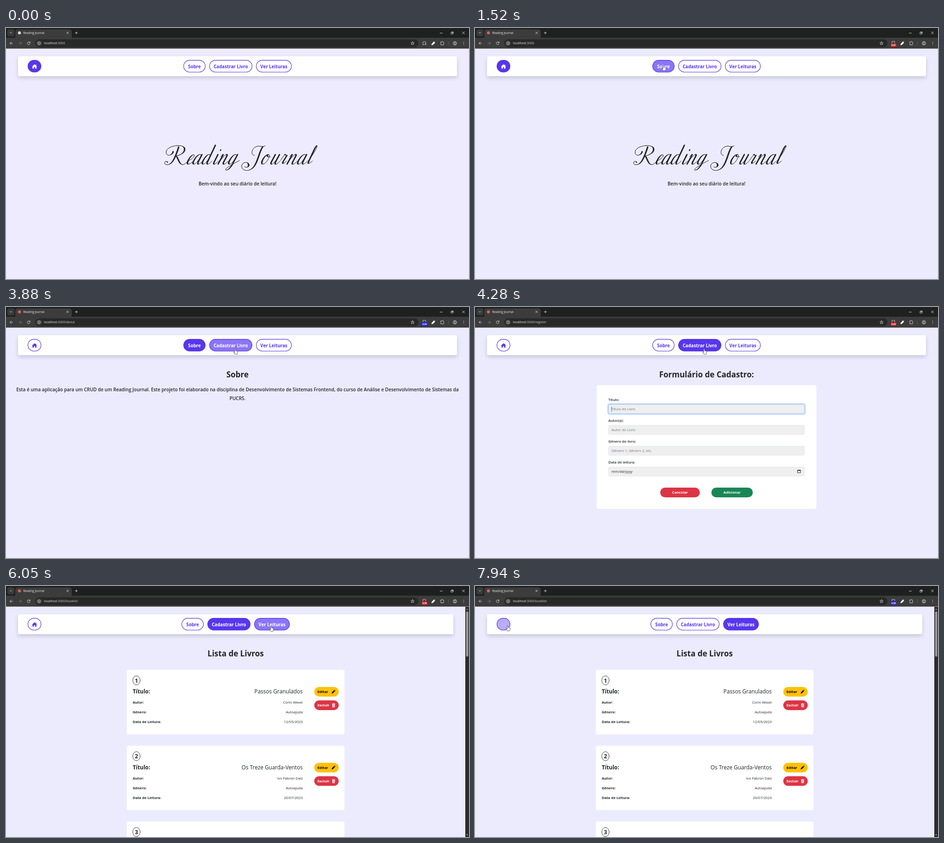
Animation, 1000 px wide and 542 px high, one loop 8 s. Source, as an HTML page with a canvas:

```html
<!DOCTYPE html>
<html lang="pt">
<head>
<meta charset="utf-8">
<title>Reading Journal</title>
<style>
html, body { margin: 0; width: 100%; height: 100%; overflow: hidden; background: #ecebfe; }
canvas { display: block; width: 100vw; height: 100vh; }
</style>
</head>
<body>
<canvas id="stage"></canvas>
<script>
const W = 1000, H = 542, LOOP = 8000;
const canvas = document.getElementById('stage');
const ctx = canvas.getContext('2d');
const scale = Math.max(1, window.devicePixelRatio || 1);
canvas.width = W * scale;
canvas.height = H * scale;

const INK = '#212529', RED = '#dc3545', GREEN = '#198754', YELLOW = '#ffc107';
const WHITE = [255, 255, 255], PURPLE = [88, 54, 238], LILAC = [139, 117, 246];
const FILLS = [WHITE, LILAC, PURPLE], LABELS = [PURPLE, WHITE, WHITE];

const CLICK = { about: 1960, register: 4150, list: 5980 };
const FADE = 130;

const clamp = v => Math.min(1, Math.max(0, v));
const ease = v => v * v * (3 - 2 * v);
const lerp = (a, b, k) => a + (b - a) * k;
const mix = (a, b, k) => `rgb(${a.map((v, i) => Math.round(lerp(v, b[i], k)))})`;

// ---- drawing helpers ----
function text(str, x, y, size, { weight = 400, color = INK, align = 'left' } = {}) {
  ctx.font = `${weight} ${size}px "Open Sans", "Noto Sans", sans-serif`;
  ctx.textAlign = align;
  ctx.fillStyle = color;
  ctx.fillText(str, x, y);
}

function box(x, y, w, h, r, fill, stroke, width = 1) {
  ctx.beginPath();
  ctx.roundRect(x, y, w, h, r);
  if (fill) { ctx.fillStyle = fill; ctx.fill(); }
  if (stroke) { ctx.strokeStyle = stroke; ctx.lineWidth = width; ctx.stroke(); }
}

function shape(d, x, y, { fill, stroke, width = 1 } = {}) {
  const path = new Path2D(d);
  ctx.save();
  ctx.translate(x, y);
  ctx.lineJoin = ctx.lineCap = 'round';
  if (fill) { ctx.fillStyle = fill; ctx.fill(path); }
  if (stroke) { ctx.strokeStyle = stroke; ctx.lineWidth = width; ctx.stroke(path); }
  ctx.restore();
}

function disc(x, y, r, fill, stroke, width = 1, ry = r) {
  ctx.beginPath();
  ctx.ellipse(x, y, r, ry, 0, 0, 7);
  if (fill) { ctx.fillStyle = fill; ctx.fill(); }
  if (stroke) { ctx.strokeStyle = stroke; ctx.lineWidth = width; ctx.stroke(); }
}

// ---- script lettering: strokes swell on the way down ----
const BOWL = 'M11 -18 C9 -23 3 -22 1 -13 C-1 -4 1 0 4 0 C8 0 10 -8 11.5 -20';
const TAIL = 'L11 -6 C11 -1 12 0 14 0 C16 0 18 -3 20 -7';
const GLYPHS = {
  R: 'M31 -37 C26 -22 20 -4 11 0 C5 3 -1 0 1 -4 C2 -7 6 -6 7 -4 M19 -27 C17 -19 6 -16 4 -24 C2 -34 18 -41 33 -40 C48 -39 46 -26 35 -21 C30 -18 26 -18 24 -18 C29 -18 31 0 39 1 C44 1 47 -3 50 -6',
  J: 'M29 -19 C20 -20 22 -34 33 -38 C40 -41 46 -35 52 -40 M47 -38 C39 -28 36 -4 26 7 C17 17 2 15 1 5 C1 -4 14 -7 16 1 C17 6 10 9 7 5',
  e: 'M0 -7 C4 -8 10 -13 9 -18 C8 -22 3 -21 1.5 -14 C0 -6 1 0 5 0 C8 0 11 -4 13 -7',
  a: `${BOWL} M11.5 -21 ${TAIL}`,
  d: `${BOWL} M11 -41 ${TAIL}`,
  i: 'M3 -21 L2.5 -5 C2.5 -1 3.5 0 5 0 C7 0 9 -3 11 -7 M4.4 -31 L4.2 -29.6',
  n: 'M0 -16 C1 -20 3 -22 3.5 -20 L2 0 M2 0 C3 -10 7 -22 11 -21 C14 -20 12 -10 12 -5 C12 -1 13 0 15 0 C17 0 19 -3 21 -7',
  g: `${BOWL} M11.5 -21 L10 2 C9 9 6 13 3 13 C0 13 0 10 3 7 C8 2 14 -3 22 -8`,
  o: 'M7 -21 C2 -21 0 -14 0 -9 C0 -3 2 0 5 0 C9 0 12 -8 11 -15 C10.5 -20 8 -22 6 -20 C5 -17 8 -15 14 -16',
  u: `M3 -21 L2 -6 C2 -1 3 0 5 0 C8 0 11 -9 12 -21 M12 -21 ${TAIL}`,
  r: 'M0 -8 C2 -16 3 -22 4 -21 C5 -19 8 -19 9 -19 L7 -6 C7 0 10 0 14 -7',
  l: 'M1 -7 C4 -14 7 -28 6 -38 C5 -42 3 -40 3 -32 L3 -6 C3 0 6 0 11 -7'
};
const WORDS = [
  ['Reading', [342, 389, 402, 422, 445, 456, 479]],
  ['Journal', [508, 550, 569, 589, 605, 628, 648]]
];

function inkGlyph(name, x0) {
  const slant = name < 'a' ? 0 : 0.47;
  const out = [];
  for (const part of GLYPHS[name].split('M').slice(1)) {
    const path = document.createElementNS('http://www.w3.org/2000/svg', 'path');
    path.setAttribute('d', 'M' + part);
    const len = path.getTotalLength(), steps = Math.ceil(len / 0.8);
    let last = null;
    for (let i = 0; i <= steps; i++) {
      const p = path.getPointAtLength(len * i / steps);
      const q = { x: x0 + p.x - p.y * slant, y: 294 + p.y };
      if (last) {
        const down = Math.max(0, (q.y - last.y) / Math.hypot(q.x - last.x, q.y - last.y));
        out.push([last, q, 0.75 + 2.3 * down ** 2.5]);
      }
      last = q;
    }
  }
  return out;
}
const lettering = WORDS.flatMap(([word, xs]) => [...word].flatMap((c, i) => inkGlyph(c, xs[i])));

// ---- browser frame ----
function browser(t, path) {
  const pale = '#e3e3e6';
  const line = (d, x, y, stroke = pale, width = 0.9) => shape(d, x, y, { stroke, width });
  box(0, 0, W, 21, 0, '#1f2020');
  box(0, 21, W, 23.6, 0, '#3c3c3c');
  box(3, 3, 15, 15, 4, '#393a3a');
  line('M-2 -1 L0 1 L2 -1', 10.5, 10.5);
  box(20, 3, 122, 22, [5, 5, 0, 0], '#3c3c3c');
  disc(29, 10.5, 3.2, t < 230 ? '#dcd6da' : '#d8625d');
  text('Reading Journal', 37.3, 13, 6.2, { color: '#f1f1f1' });
  line('M-2 -2 L2 2 M2 -2 L-2 2', 133, 10.5);
  line('M-2.5 0 H2.5 M0 -2.5 V2.5', 152, 10.5);
  line('M-2.5 0 H2.5', 940, 11);
  line('M-2 -1 H1.5 V2.5 H-2 Z M-1 -2 H2.5 V1.5', 963.5, 10.5);
  line('M-2.5 -2.5 L2.5 2.5 M2.5 -2.5 L-2.5 2.5', 988, 10.5);

  line('M3 0 H-3 M0 -3 L-3 0 L0 3', 11.5, 33, '#c9d3ee');
  line('M-3 0 H3 M0 -3 L3 0 L0 3', 30.5, 33, '#808080');
  line('M2.6 -1.5 A3 3 0 1 0 2.8 1 M3 -3.2 V-1 H0.8', 49, 33);
  box(63, 24.5, 828, 17, 8.5, '#282828');
  disc(71.5, 33, 6.3, '#3c3c3c');
  disc(71.5, 33, 3.2, null, pale, 0.8);
  line('M0 -0.3 V1.6 M0 -1.7 V-1.6', 71.5, 33);
  text('localhost', 82, 35.4, 6.75, { color: '#f3f3f3' });
  const hostEnd = 82 + ctx.measureText('localhost').width;
  text(':3000' + path, hostEnd, 35.4, 6.75, { color: '#cfcfcf' });
  line('M0 -3.6 L1 -1.1 L3.6 -1 L1.6 0.7 L2.3 3.2 L0 1.8 L-2.3 3.2 L-1.6 0.7 L-3.6 -1 L-1 -1.1 Z', 878, 33, pale, 0.8);

  const badge = t >= 480;
  ctx.setLineDash([2, 1.2]);
  line('M-3 3 V-3 H3 V0 M-3 3 H0', 903.5, badge ? 32 : 33);
  ctx.setLineDash([]);
  if (badge) {
    const sec = Math.floor((t + 120) / 1000);
    const blue = (t >= 3880 && t < 4150) || t >= 7940;
    box(898.3, 32.8, 11.6, 8, 1.5, blue ? '#2020e8' : '#d8141c');
    text('0:0' + sec, 904.1, 38.6, 4.9, { weight: 700, color: '#fff', align: 'center' });
  } else line('M1 2 H4 M2.5 0.5 V3.5', 903.5, 33);

  shape('M-3.5 3.5 L-3 1.5 L0.5 -2 L2 -0.5 L-1.5 3 Z M0.5 -3 L3 -0.5 M1.5 -2 L3 -3.4', 923, 33, { fill: '#fff', stroke: '#fff', width: 1.1 });
  line('M-3 -2 H-1 A1.2 1.2 0 0 1 1.4 -2 H3 V0 A1.3 1.3 0 0 1 3 2.4 V4 H-3 V2 A1.2 1.2 0 0 0 -3 -0.2 Z', 942, 32.3);
  box(955.2, 29, 0.7, 8, 0, '#66676a');
  disc(969.5, 33, 3.7, null, pale, 0.9);
  disc(969.5, 32, 1.2, null, pale, 0.8);
  line('M-2.3 2.6 Q0 0.6 2.3 2.6', 969.5, 33, pale, 0.8);
  for (const dy of [-2.6, 0, 2.6]) disc(988.5, 33 + dy, 0.65, pale);
}

// ---- navigation ----
// Each state: 0 idle, 1 hovered, 2 current page.
const BUTTONS = [
  { x: 47.4, w: 28.2, fixed: true, keys: [[0, 2], [CLICK.about, 0], [7862, 1]] },
  { x: 383.7, w: 46.6, label: 'Sobre', keys: [[0, 0], [1330, 1], [CLICK.about, 2], [CLICK.register, 0]] },
  { x: 439.6, w: 91.8, label: 'Cadastrar Livro', keys: [[0, 0], [3250, 1], [CLICK.register, 2], [6070, 0]] },
  { x: 540.6, w: 75.8, label: 'Ver Leituras', keys: [[0, 0], [4760, 1], [6070, 2]] }
];
const HOUSE = 'M-5.2 0.2 L0 -4.8 L2.6 -2.3 V-4 H3.8 V-1.2 L5.2 0.2 L4.2 0.8 V4.7 H1.3 V1.6 H-1.3 V4.7 H-4.2 V0.8 Z';

function navbar(t, shift) {
  ctx.save();
  ctx.shadowColor = 'rgba(0,0,0,.16)';
  ctx.shadowBlur = 8 * scale;
  ctx.shadowOffsetY = 4 * scale;
  box(26, 61, 948 - shift * 2, 43, 3, '#fff');
  ctx.restore();
  for (const b of BUTTONS) {
    const n = b.keys.findLastIndex(k => t >= k[0]);
    const [start, now] = b.keys[n];
    const before = n ? b.keys[n - 1][1] : now;
    const k = clamp((t - start) / FADE);
    const x = b.x - (b.fixed ? 0 : shift);
    box(x, 69.6, b.w, 25.6, 12.8, mix(FILLS[before], FILLS[now], k), mix(PURPLE, [78, 48, 208], 0.5), 1.15);
    const color = mix(LABELS[before], LABELS[now], k);
    if (b.label) text(b.label, x + b.w / 2, 86.5, 9.7, { weight: 700, color, align: 'center' });
    else shape(HOUSE, x + b.w / 2, 83, { fill: color });
  }
}

// ---- pages ----
const center = weight => ({ weight, align: 'center' });
const heading = (str, x) => text(str, x, 152, 17, center(700));
const lead = (str, y) => text(str, 500, y, 10, center(600));

function home() {
  ctx.strokeStyle = INK;
  ctx.lineCap = 'round';
  for (const [a, b, w] of lettering) {
    ctx.lineWidth = w;
    ctx.beginPath();
    ctx.moveTo(a.x, a.y);
    ctx.lineTo(b.x, b.y);
    ctx.stroke();
  }
  lead('Bem-vindo ao seu diário de leitura!', 340.3);
}

function about() {
  heading('Sobre', 500);
  lead('Esta é uma aplicação para um CRUD de um Reading Journal. Este projeto foi elaborado na disciplina de ' +
    'Desenvolvimento de Sistemas Frontend, do curso de Análise e Desenvolvimento de Sistemas da', 182.2);
  lead('PUCRS.', 200.6);
}

const FIELDS = [
  ['Título:', 'Título do Livro'],
  ['Autor(a):', 'Autor do Livro'],
  ['Gênero do livro:', 'Gênero 1, Gênero 2, etc.'],
  ['Data de leitura:', 'mm/dd/yyyy']
];

function pill(label, x, y, w, fill) {
  box(x, y, w, 21, 10.5, fill);
  text(label, x + w / 2, y + 13.3, 7.8, { weight: 700, color: '#fff', align: 'center' });
}

function register(t) {
  heading('Formulário de Cadastro:', 500);
  box(263, 169, 474, 267, 3.5, '#fff');
  FIELDS.forEach(([label, hint], i) => {
    const y = 210 + i * 45;
    text(label, 288, y - 7, 7.8, { weight: 600 });
    if (!i) box(287, y - 1, 426, 22.5, 4, null, '#c3dafd', 2.4);
    box(288.3, y + 0.3, 423.4, 20, 3, '#efefef', i ? '#dee2e6' : '#86b7fe', 0.7);
    text(hint, 294.8, y + 13.2, 7.8, { color: i === 3 ? INK : '#6f747a' });
  });
  const caret = (t >= 4200 && t < 4690) || (t >= 5200 && t < 5660);
  if (caret) box(294.6, 215, 0.7, 11, 0, '#3b342c');
  shape('M-3 -2.6 H3 V3 H-3 Z M-3 -1.8 H3 M-1.6 -3.4 V-2.6 M1.6 -3.4 V-2.6', 700, 355, { stroke: '#111', width: 0.9 });
  pill('Cancelar', 400, 390, 85.5, RED);
  pill('Adicionar', 510.5, 390, 89.5, GREEN);
}

const BOOKS = [
  ['Passos Granulados', 'Corin Wexel', 'Autoajuda', '12/05/2023'],
  ['Os Treze Guarda-Ventos', 'Ivo Fabron Dalz', 'Autoajuda', '20/07/2023'],
  ['', '', '', '']
];
const ROWS = ['Título:', 'Autor:', 'Gênero:', 'Data de Leitura:'];

function bookCard(book, i) {
  const y = 181.3 + i * 163.7;
  box(261, y, 470, 139, 3.5, '#fff');
  disc(281.8, y + 22.5, 8, null, INK, 0.9, 9.8);
  text(String(i + 1), 281.8, y + 27.4, 12.3, center(700));
  ROWS.forEach((row, j) => {
    const base = y + (j ? 52 + j * 20.9 : 51), size = j ? 7.7 : 11.8;
    text(row, 273.7, base, size, { weight: 700 });
    text(book[j], 641, base, size, { align: 'right' });
  });
  box(665.7, y + 36.7, 53, 20.8, 10.4, YELLOW);
  text('Editar', 672.8, y + 50, 7.7, { weight: 700, color: '#000' });
  shape('M-4 4 L-3.2 1.2 L1.2 -3.2 L3.2 -1.2 L-1.2 3.2 Z M1.9 -3.9 L2.7 -4.4 L4.4 -2.7 L3.9 -1.9 Z', 707.3, y + 47, { fill: '#000' });
  box(665.7, y + 65.8, 53, 20.8, 10.4, RED);
  text('Excluir', 672.8, y + 79.1, 7.7, { weight: 700, color: '#fff' });
  shape('M-3.5 -3.6 H-1.2 L-0.8 -4.3 H0.8 L1.2 -3.6 H3.5 V-2.6 H-3.5 Z M-3 -2 H3 L2.6 4.2 H-2.6 Z', 707.5, y + 76.2, { fill: '#fff' });
  shape('M-1.3 -0.8 V3 M0 -0.8 V3 M1.3 -0.8 V3', 707.5, y + 76.2, { stroke: RED, width: 0.5 });
}

function bookList() {
  heading('Lista de Livros', 496);
  BOOKS.forEach(bookCard);
  box(992, 45, 8, 497, 0, '#2c2c2c');
  box(993.8, 55, 4.6, 97.5, 2.3, '#9f9f9f');
  shape('M-2 1.2 L0 -1.4 L2 1.2 Z', 996, 50.2, { fill: '#9f9f9f' });
  shape('M-2 -1.2 L0 1.4 L2 -1.2 Z', 996, 537.5, { fill: '#9f9f9f' });
}

// ---- pointer ----
const TRACK = [
  [770, 903, 40], [1080, 640, 120], [1400, 407, 80], [2400, 407, 80], [2700, 445, 118],
  [2820, 445, 118], [3100, 470, 120], [3400, 494, 91], [3570, 495, 90], [4450, 495, 90],
  [4900, 572.5, 86], [6640, 572.5, 86], [6980, 80, 146], [7180, 80, 146], [7880, 70.5, 85]
];
const ARROW = 'M0 0 V10.5 L2.5 8.2 L4.2 12 L5.9 11.2 L4.3 7.6 H7.6 Z';
const HAND = 'M-1 1 Q0 -0.6 1 1 V4.6 Q2 3.8 2.8 5 Q3.8 4.4 4.3 5.6 Q5.6 5.4 5.5 7 Q5.4 9.6 4.3 12 H-0.8 Q-2 10 -3.4 8 Q-3.6 6.6 -2.2 7 L-1 8.2 Z';

function pointer(t, shift) {
  if (t < TRACK[0][0]) return;
  const n = TRACK.findLastIndex(k => t >= k[0]);
  const a = TRACK[n], b = TRACK[n + 1] || a;
  const k = a === b ? 0 : ease((t - a[0]) / (b[0] - a[0]));
  const x = lerp(a[1], b[1], k), y = lerp(a[2], b[2], k);
  const over = y > 69 && y < 96 && BUTTONS.some(({ x: bx, w, fixed }) => {
    const left = bx - (fixed ? 0 : shift);
    return x > left && x < left + w;
  });
  shape(over ? HAND : ARROW, x, y, { fill: '#fff', stroke: '#3a3a48', width: 0.8 });
}

function draw(t) {
  const onList = t >= CLICK.list;
  const shift = onList ? 4 : 0;
  ctx.setTransform(scale, 0, 0, scale, 0, 0);
  box(0, 0, W, H, 0, t < 230 ? '#eeebfe' : '#ecebfe');
  navbar(t, shift);
  let path = '';
  if (onList) { path = '/booklist'; bookList(); }
  else if (t >= CLICK.register) { path = '/register'; register(t); }
  else if (t >= CLICK.about) { path = '/about'; about(); }
  else home();
  browser(t, path);
  pointer(t, shift);
}

const begin = performance.now();
function tick() {
  draw((performance.now() - begin) % LOOP);
  requestAnimationFrame(tick);
}
tick();
</script>
</body>
</html>
```
